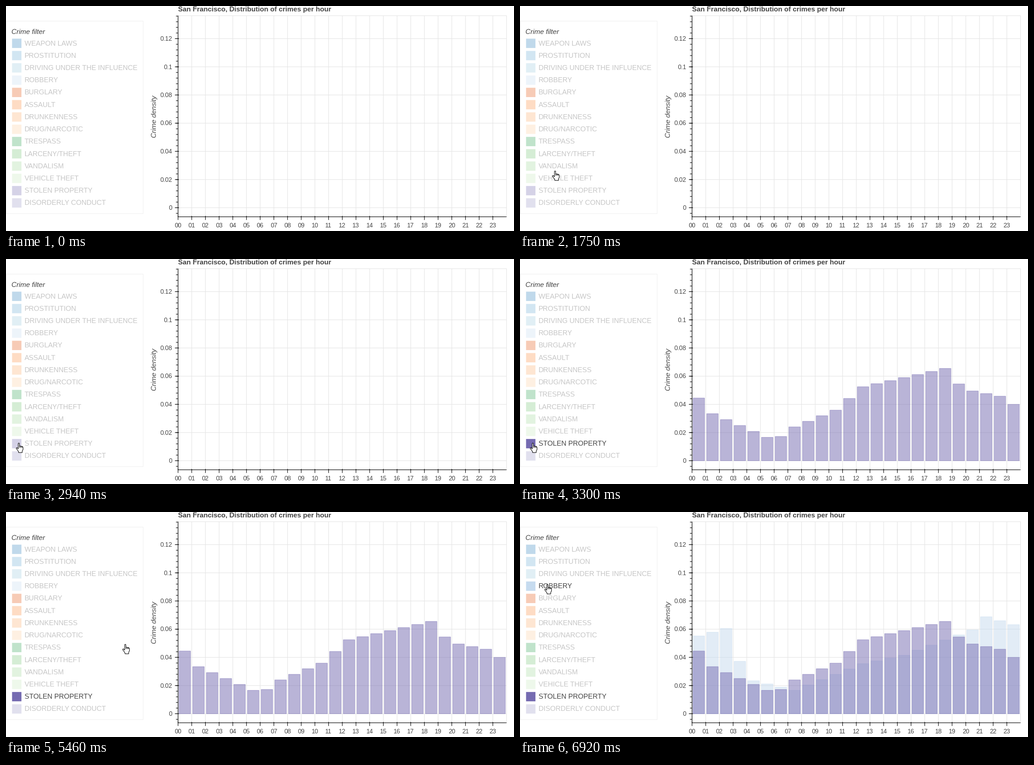
A matplotlib script for the animation above (7990 ms loop, 1122 px wide and 499 px high).

```python
import matplotlib.pyplot as plt
import numpy as np
from matplotlib.animation import FuncAnimation
from matplotlib.collections import LineCollection
from matplotlib.patches import PathPatch, Rectangle
from matplotlib.path import Path
from matplotlib.transforms import Affine2D

W, H, DPI = 1122, 499, 64
LOOP, STEP = 7990, 17
PX = 72 / DPI
LINE = 1.15
INK = "#444444"
GRID = "#e5e5e5"

# Plot area in pixels
LEFT, RIGHT, TOP, BOTTOM = 380, 1105.5, 21.5, 467.5
HOUR = (RIGHT - LEFT) / 24
ZERO, UNIT = 447.4, 3125  # y of zero density, pixels per unit

plt.rcParams["font.family"] = "Liberation Sans"
plt.rcParams["text.hinting"] = "no_autohint"
fig = plt.figure(figsize=(W / DPI, H / DPI), dpi=DPI, facecolor="white")
ax = fig.add_axes([0, 0, 1, 1])
ax.set_xlim(0, W)
ax.set_ylim(H, 0)
ax.set_autoscale_on(False)
ax.axis("off")


def label(x, y, text, size=15.35, **kw):
    kw = {"color": INK, "va": "baseline", **kw}
    return ax.text(x, y, text, fontsize=size * PX, **kw)


def lines(segments, color, z):
    ax.add_collection(LineCollection(segments, colors=color, zorder=z,
                                     linewidths=LINE * PX, capstyle="butt",
                                     snap=False), autolim=False)


def across(x0, x1, ys):
    return [[(x0, y), (x1, y)] for y in ys]


def down(y0, y1, xs):
    return [[(x, y0), (x, y1)] for x in xs]


def box(x0, y0, x1, y1, color):
    lines(across(x0, x1, (y0, y1)) + down(y0, y1, (x0, x1)), color, 0)


# Grid, axes and ticks
hours = LEFT + HOUR * np.arange(24)
values = 0.02 * np.arange(7)
majors = ZERO - UNIT * values
minors = ZERO - UNIT * 0.004 * np.arange(-1, 35)

lines(down(TOP, BOTTOM, hours) + across(LEFT, RIGHT, majors), GRID, 0)
box(LEFT, TOP, RIGHT, BOTTOM, GRID)
lines(down(TOP, BOTTOM, [LEFT]) + across(LEFT, RIGHT, [BOTTOM])
      + across(LEFT - 7, LEFT + 2, majors) + across(LEFT - 4.5, LEFT, minors)
      + down(BOTTOM - 2, BOTTOM + 7, hours), "black", 2)

for h, x in enumerate(hours):
    label(x, 491, f"{h:02d}", 13.6, ha="center")
for v, y in zip(values, majors):
    label(367.3, y + 4.6, f"{v:g}", 13.6, ha="right")

label(380.4, 12.2, "San Francisco, Distribution of crimes per hour",
      weight="bold")
label(332.3, 245, "Crime density", style="italic", ha="center",
      rotation=90, rotation_mode="anchor")

# Legend
CRIMES = ["WEAPON LAWS", "PROSTITUTION", "DRIVING UNDER THE INFLUENCE",
          "ROBBERY", "BURGLARY", "ASSAULT", "DRUNKENNESS", "DRUG/NARCOTIC",
          "TRESPASS", "LARCENY/THEFT", "VANDALISM", "VEHICLE THEFT",
          "STOLEN PROPERTY", "DISORDERLY CONDUCT"]
COLORS = dict(zip(CRIMES, plt.colormaps["tab20c"].colors))

box(0.5, 33.5, 303, 460.5, "#f1f1f1")
label(12.3, 61.8, "Crime filter", style="italic")

entries = {}
for i, name in enumerate(CRIMES):
    y = 82.2 + 27.23 * i
    swatch = ax.add_patch(Rectangle((13.4, y - 9.8), 20.7, 20.7, lw=0,
                                    fc=COLORS[name], snap=False))
    entries[name] = swatch, label(41, y + 5.3, name)

# Time each series is switched on, and the turning points of its daily
# curve as hour: density per thousand
SERIES = {
    "ROBBERY": (6920, {0: 55.2, 2: 60.5, 3: 37.2, 4: 23.4, 7: 16.6,
                       12: 35.5, 15: 41.5, 20: 59.5, 21: 68.8, 23: 63.2}),
    "STOLEN PROPERTY": (3300, {0: 44.5, 1: 33.4, 5: 16.6, 6: 17.2, 7: 24,
                               10: 35.9, 12: 52.5, 18: 65.5, 19: 54.5,
                               20: 49.5, 22: 45.8, 23: 40}),
}
bars = {}
for name, (_, curve) in SERIES.items():
    density = np.interp(np.arange(24), list(curve), list(curve.values()))
    bars[name] = ax.bar(hours + HOUR / 2 - 0.2, -UNIT * density / 1000,
                        0.84 * HOUR, bottom=ZERO, color=COLORS[name],
                        edgecolor=COLORS[name], linewidth=LINE * PX,
                        alpha=0.5, zorder=1, snap=False)

# Mouse pointers, with their top left corner at the origin
ARROW = Path([(0.5, 0.6), (0.5, 16.2), (4, 12.9), (6.4, 18.4), (8.6, 17.4),
              (6.3, 12.1), (11, 11.7), (0.5, 0.6)], closed=True)
PALM = Path([(5, 1.6), (6.3, 0.6), (7.6, 1.6), (7.8, 7), (14.6, 8.6),
             (15.6, 10.2), (15.6, 15), (13.8, 18.6), (13.8, 21.8),
             (5.8, 21.8), (5.6, 19.4), (0.6, 12.6), (1.3, 10.9), (2.9, 11.3),
             (5, 13.6), (5, 1.6)], closed=True)
KNUCKLES = [Path([(x, 7.5), (x, 11.2)]) for x in (7.8, 10.5, 13.2)]
HAND = Path.make_compound_path(PALM, *KNUCKLES)


def pointer(path):
    return ax.add_patch(PathPatch(path, fc="white", ec="black", lw=1.1 * PX,
                                  joinstyle="round", zorder=10, snap=False))


arrow, hand = pointer(ARROW), pointer(HAND)

# Each move arcs from the last resting place through a midpoint to the next
TICK = 50
ENTRY = (912, 402)
MOVES = [  # start, end, midpoint, rest
    (500, 670, (758, 354), (604, 306)),
    (1070, 1230, (330, 284), (114, 318)),
    (1480, 2210, (60, 378), (21, 427.5)),
    (2460, 2940, (25, 396), (22, 407.5)),
    (4210, 4410, (180, 373), (371, 376)),
    (4690, 5000, (402, 383), (420, 387)),
    (5250, 5760, (240, 282), (106, 188)),
    (6020, 6590, (48, 157), (54, 160)),
]


def pointer_at(t):
    pos, origin = None, ENTRY
    for start, end, mid, rest in MOVES:
        if t < start:
            break
        u = min(1, ((t - start) // TICK + 1) / ((end - start) / TICK + 1))
        if t >= end:
            u = 1
        a, b, c = (np.array(p) for p in (origin, mid, rest))
        pos = ((1 - u) * (1 - 2 * u) * a + 4 * u * (1 - u) * b
               + u * (2 * u - 1) * c)
        origin = rest
    return pos


def update(i):
    t = i * STEP + STEP - 1
    on = {name for name, (start, _) in SERIES.items() if t >= start}
    for name, pair in entries.items():
        for artist in pair:
            artist.set_alpha(1 if name in on else 0.3)
    for name, group in bars.items():
        for bar in group:
            bar.set_visible(name in on)

    pos = pointer_at(t)
    over_legend = pos is not None and pos[0] < 303
    hand.set_visible(over_legend)
    arrow.set_visible(pos is not None and not over_legend)
    if pos is not None:
        place = Affine2D().translate(*pos) + ax.transData
        arrow.set_transform(place)
        hand.set_transform(place)
    return []


anim = FuncAnimation(fig, update, frames=LOOP // STEP, interval=STEP,
                     repeat=True, repeat_delay=0, blit=False)
plt.show()
```
